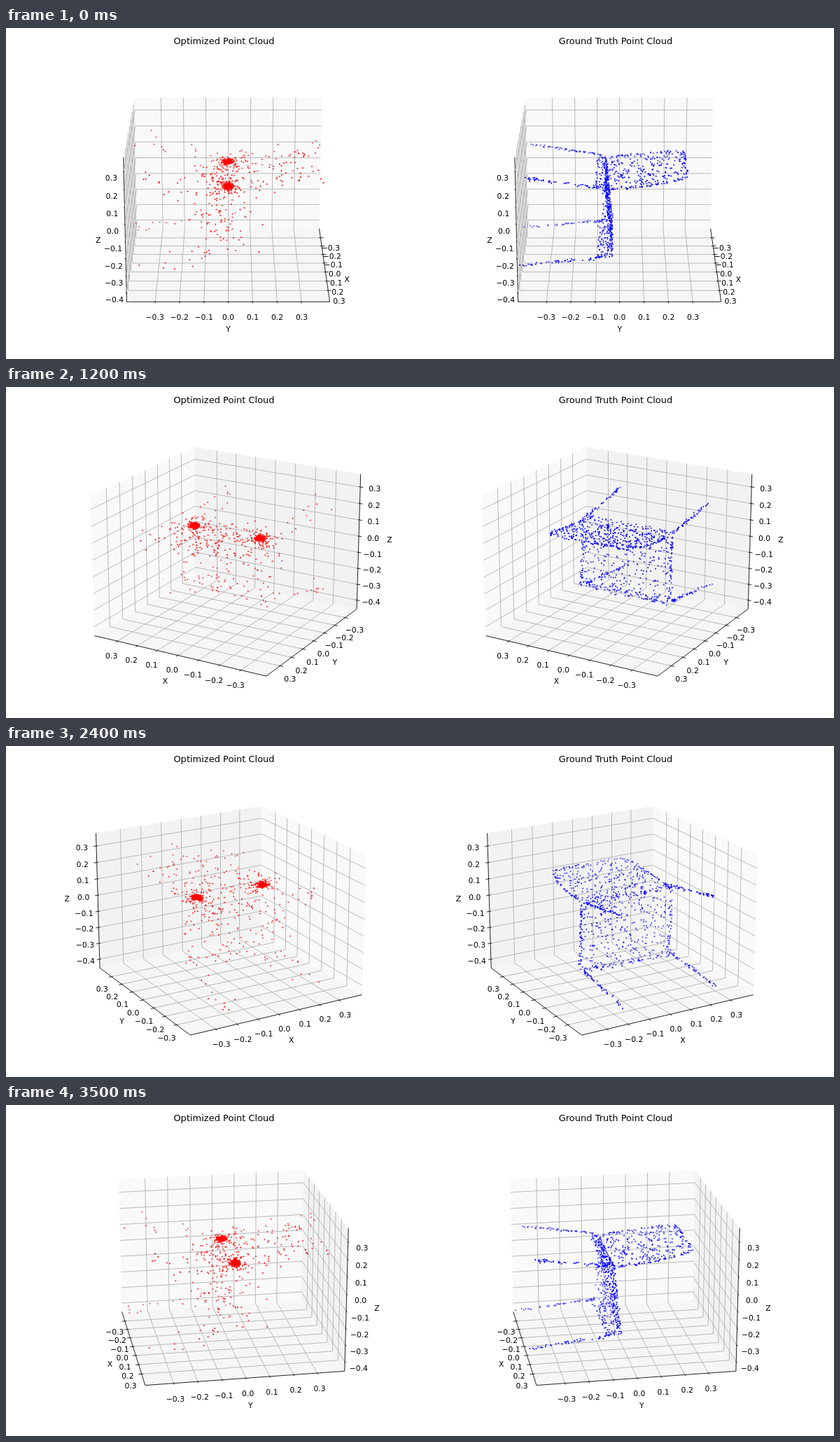
Write an HTML page with a canvas that moves like this. It is 1183 by 473 pixels and loops after 3.6 s.

```html
<!DOCTYPE html>
<html lang="en">
<head>
<meta charset="utf-8">
<title>Point clouds</title>
<style>
html, body { margin: 0; width: 100%; height: 100%; overflow: hidden; background: #fff; }
canvas { display: block; }
</style>
</head>
<body>
<canvas id="stage" width="1183" height="473"></canvas>
<script>
const ctx = document.getElementById('stage').getContext('2d');
const FONT = '"DejaVu Sans", Verdana, sans-serif';
const LABEL_SIZE = 10.83, TITLE_SIZE = 13;
const STEPS = 36, STEP_MS = 100;

// Camera and axes box, in data units
const ELEV = 20 * Math.PI / 180, SE = Math.sin(ELEV), CE = Math.cos(ELEV);
const DIST = 10, ZOOM = 2337, CY = 239.4;
const CENTER = [0, 0, -0.0395], HALF = 0.41667, SCALE = [1.429, 1.429, 1.0717];
const DELTA = 0.8 / 12, TICK_PAD = 0.0465, LABEL_PAD = 0.101;
const PANE_COLORS = ['#f9f9f9', '#f2f2f2', '#f6f6f6'];
const TICKS = [
  [-3, -2, -1, 0, 1, 2, 3],
  [-3, -2, -1, 0, 1, 2, 3],
  [-4, -3, -2, -1, 0, 1, 2, 3]
].map(list => list.map(n => n / 10));

// Seeded random numbers
let seed = 20417;
function rnd() {
  seed = (seed + 0x6D2B79F5) | 0;
  let t = Math.imul(seed ^ (seed >>> 15), 1 | seed);
  t = (t + Math.imul(t ^ (t >>> 7), 61 | t)) ^ t;
  return ((t ^ (t >>> 14)) >>> 0) / 4294967296;
}
const span = (a, b) => a + (b - a) * rnd();
const gauss = s => s * Math.sqrt(-2 * Math.log(1 - rnd())) * Math.cos(2 * Math.PI * rnd());
const mix = (a, b, t) => a + (b - a) * t;
const many = (n, make) => Array.from({ length: n }, make);
const jitter = (p, s, sz = s) => [p[0] + gauss(s), p[1] + gauss(s), p[2] + gauss(sz)];

// Chair lying on its back: seat upright, backrest flat, legs towards -y
const Z_TOP = 0.11, Z_LOW = -0.302, SIDE = 0.22;
const seatY = z => mix(-0.031, -0.059, (z - Z_LOW) / (Z_TOP - Z_LOW));

function seatPoint() {
  const z = span(Z_LOW, Z_TOP);
  return [span(-SIDE, SIDE), seatY(z), z];
}
function rimPoint(z) {
  return [span(-SIDE, SIDE), span(-0.1, seatY(z)), z + span(-0.012, 0.006)];
}
function sidePoint(sx) {
  const z = span(Z_LOW, Z_TOP);
  return [sx * SIDE, span(-0.07, seatY(z)), z];
}
function backPoint(x = span(-1, 1), s = rnd()) {
  return [x * 0.213 * (1 - 0.2 * s ** 4), mix(-0.04, 0.28, s), 0.102 + 0.05 * s ** 1.5];
}
function legPoint(sx, top) {
  const s = rnd();
  const x = sx * mix(0.215, 0.224, s);
  return top
    ? [x, mix(-0.095, -0.39, s), mix(0.113, 0.17, s)]
    : [x, mix(-0.06, -0.416, s), mix(Z_LOW, -0.349, s)];
}
const CORNERS = [[-1, true], [1, true], [-1, false], [1, false]];

function chair() {
  return [
    ...many(275, () => jitter(seatPoint(), 0.002)),
    ...many(85, () => rimPoint(Z_LOW)),
    ...many(65, () => rimPoint(Z_TOP)),
    ...many(45, () => sidePoint(-1)),
    ...many(45, () => sidePoint(1)),
    ...many(235, () => jitter(backPoint(), 0.004)),
    ...many(35, () => jitter(backPoint(-1), 0.003)),
    ...many(35, () => jitter(backPoint(1), 0.003)),
    ...many(20, () => jitter(backPoint(span(-1, 1), 1), 0.003)),
    ...CORNERS.flatMap(c => many(45, () => jitter(legPoint(...c), 0.004)))
  ];
}

function estimate() {
  const blob = (...p) => [
    ...many(210, () => jitter(p, 0.0105, 0.0075)),
    ...many(45, () => jitter(p, 0.032, 0.022))
  ];
  return [
    ...blob(0.169, 0, 0.096),
    ...blob(-0.154, -0.003, 0.094),
    ...many(150, () => {
      const [x, y, z] = seatPoint();
      return [x + gauss(0.015), y + gauss(0.065), z + gauss(0.015)];
    }),
    ...many(130, () => {
      const s = rnd() ** 1.35;
      return [span(-SIDE, SIDE) + gauss(0.025), mix(-0.05, 0.4, s), 0.09 + 0.08 * s + gauss(0.034)];
    }),
    ...CORNERS.flatMap(c => many(11, () => jitter(legPoint(...c), 0.03)))
  ];
}

const panels = [
  { title: 'Optimized Point Cloud', titleX: 311.5, cx: 317.6, color: '#f00', points: estimate() },
  { title: 'Ground Truth Point Cloud', titleX: 871, cx: 876.7, color: '#00f', points: chair() }
];

function camera(azim, cx) {
  const s = Math.sin(azim), c = Math.cos(azim);
  return p => {
    const [x, y, z] = p.map((v, i) => (v - CENTER[i]) * SCALE[i]);
    const near = x * c + y * s;
    const depth = DIST - near * CE - z * SE;
    return [
      cx + ZOOM * (y * c - x * s) / depth,
      CY - ZOOM * (z * CE - near * SE) / depth,
      depth
    ];
  };
}

function path(project, pts) {
  ctx.beginPath();
  for (const p of pts) {
    const [x, y] = project(p);
    ctx.lineTo(x, y);
  }
}
function line(project, pts, color) {
  path(project, pts);
  ctx.strokeStyle = color;
  ctx.stroke();
}
function text(str, x, y, size = LABEL_SIZE) {
  ctx.font = size + 'px ' + FONT;
  ctx.fillStyle = '#000';
  ctx.fillText(str, x, y);
}
// Copy of a point with some coordinates replaced
const put = (p, changes) => p.map((v, i) => i in changes ? changes[i] : v);

function drawPanes(project, back, front) {
  back.forEach((v, i) => {
    const j = (i + 1) % 3, k = (i + 2) % 3;
    path(project, [
      back, put(back, { [j]: front[j] }),
      put(front, { [i]: v }), put(back, { [k]: front[k] })
    ]);
    ctx.fillStyle = PANE_COLORS[i];
    ctx.fill();
  });
}

function drawAxis(i, project, back, front) {
  const dir = i === 0 ? 1 : 0;
  const edge = put(back, { [dir]: front[dir] });
  const out = Math.sign(edge[dir] - CENTER[dir]);
  const pushed = (value, pad) => edge.map((v, k) =>
    k === i ? value : v + Math.sign(v - CENTER[k]) * pad);

  line(project, [edge, put(edge, { [i]: front[i] })], '#000');

  const j = (i + 1) % 3, k = (i + 2) % 3;
  for (const t of TICKS[i]) {
    const base = put(back, { [i]: t });
    line(project, [put(base, { [j]: front[j] }), base, put(base, { [k]: front[k] })], '#b0b0b0');
  }
  for (const t of TICKS[i]) {
    line(project, [
      put(edge, { [i]: t, [dir]: edge[dir] - 0.1 * DELTA * out }),
      put(edge, { [i]: t, [dir]: edge[dir] + 0.2 * DELTA * out })
    ], '#000');
    const [x, y] = project(pushed(t, TICK_PAD));
    text(t.toFixed(1).replace('-', '\u2212'), x, y + 8.2);
  }
  const [x, y] = project(pushed(CENTER[i], LABEL_PAD));
  text('XYZ'[i], x, y + 3.9);
}

function drawPoints(project, points, color) {
  const dots = points.map(project).sort((a, b) => b[2] - a[2]);
  const far = dots[0][2], range = far - dots[dots.length - 1][2];
  ctx.fillStyle = color;
  for (const [x, y, depth] of dots) {
    ctx.globalAlpha = 0.6 + 0.4 * (far - depth) / range;
    ctx.beginPath();
    ctx.arc(x, y, 1.05, 0, 2 * Math.PI);
    ctx.fill();
  }
  ctx.globalAlpha = 1;
}

function draw(step) {
  const azim = step * 2 * Math.PI / STEPS;
  // The back corner lies opposite the viewer
  const high = [Math.cos(azim) < 0, Math.sin(azim) < 0, false];
  const back = CENTER.map((c, i) => c + (high[i] ? HALF : -HALF));
  const front = CENTER.map((c, i) => c - (high[i] ? HALF : -HALF));

  ctx.fillStyle = '#fff';
  ctx.fillRect(0, 0, 1183, 473);
  ctx.textAlign = 'center';
  ctx.lineWidth = 0.87;
  for (const p of panels) {
    const project = camera(azim, p.cx);
    drawPanes(project, back, front);
    for (let i = 0; i < 3; i++) drawAxis(i, project, back, front);
    drawPoints(project, p.points, p.color);
    text(p.title, p.titleX, 22.8, TITLE_SIZE);
  }
}

let start = null, shown = -1;
function tick(now) {
  if (start === null) start = now;
  const step = Math.floor((now - start) / STEP_MS) % STEPS;
  if (step !== shown) {
    shown = step;
    draw(step);
  }
  requestAnimationFrame(tick);
}
draw(0);
requestAnimationFrame(tick);
</script>
</body>
</html>
```
